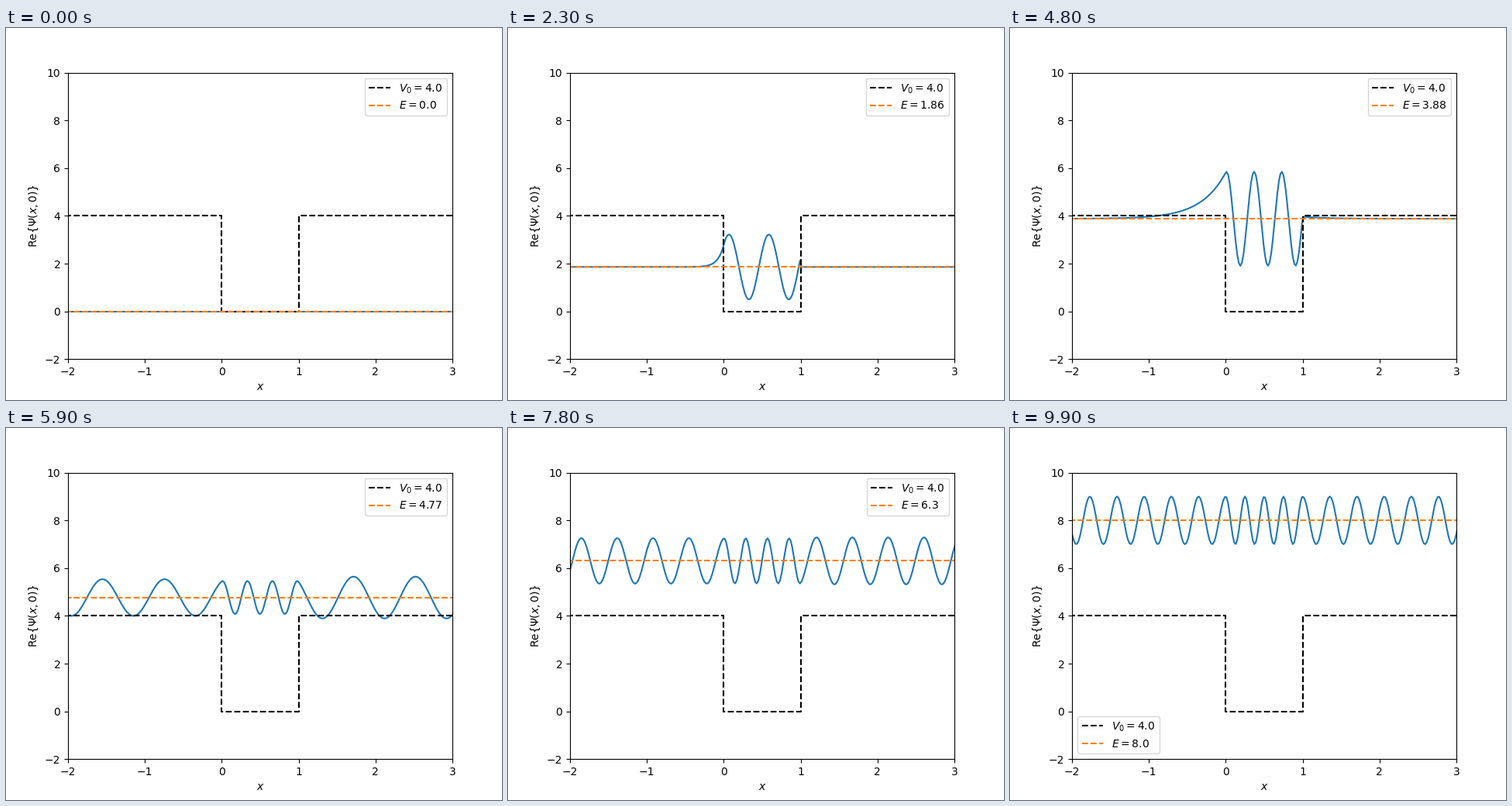
These frames come from a looping animation (640x480 px, 10000 ms). A matplotlib script:

```python
import numpy as np
import matplotlib.pyplot as plt
from matplotlib.animation import FuncAnimation

FRAMES = 100
V0 = 4.0
L = 1.0
HBAR = 1 / (2 * np.pi)
MASS = 1.0

x = np.linspace(-5, 5, 500)
energies = np.linspace(0, 2 * V0, FRAMES)


def wavenumber(energy):
    return np.sqrt(2 * MASS * energy) / HBAR


def bound(e):
    """Wave in the well with decaying tails, for e below V0."""
    k, kappa = wavenumber(e), wavenumber(V0 - e)
    r = (k - 1j * kappa) / (k + 1j * kappa)
    t = 1 + r
    inside = np.exp(-1j * k * x) + r * np.exp(1j * k * x)
    tails = t * np.exp(-kappa * np.abs(x))
    return np.where((x < 0) | (x > L), tails, inside).real


def scattered(e):
    """Plane wave coming from the left, for e above V0."""
    k, q = wavenumber(e), wavenumber(e - V0)
    d = np.cos(k * L) - 0.5j * (k / q + q / k) * np.sin(k * L)
    r = 0.5j * (k / q - q / k) * np.sin(k * L) / d
    left = np.exp(1j * q * x) + r * np.exp(-1j * q * x)
    inside = (1 + r) * np.cos(k * x) + 1j * q / k * (1 - r) * np.sin(k * x)
    right = np.exp(1j * q * (x - L)) / d
    return np.select([x < 0, x <= L], [left, inside], right).real


fig, ax = plt.subplots(figsize=(6.4, 4.8), dpi=100)
wave, = ax.plot(x, 0 * x)
ax.plot([-5, 0, 0, L, L, 5], [V0, V0, 0, 0, V0, V0], "k--",
        label=f"$V_0 = {V0}$")
level, = ax.plot([-5, 5], [0, 0], "--", color="C1")
ax.set_xlim(-2, 3)
ax.set_ylim(-2, 10)
ax.set_xlabel("$x$")
ax.set_ylabel(r"Re$\{\Psi(x, 0)\}$")


def update(i):
    e = energies[i]
    psi = bound(e) if e < V0 else scattered(e)
    wave.set_ydata(psi + e)
    level.set_ydata([e, e])
    level.set_label(f"$E = {round(float(e), 2)}$")
    ax.legend(loc="best")
    return wave, level


anim = FuncAnimation(fig, update, frames=FRAMES, interval=100,
                     repeat=True, repeat_delay=0)
plt.show()
```
